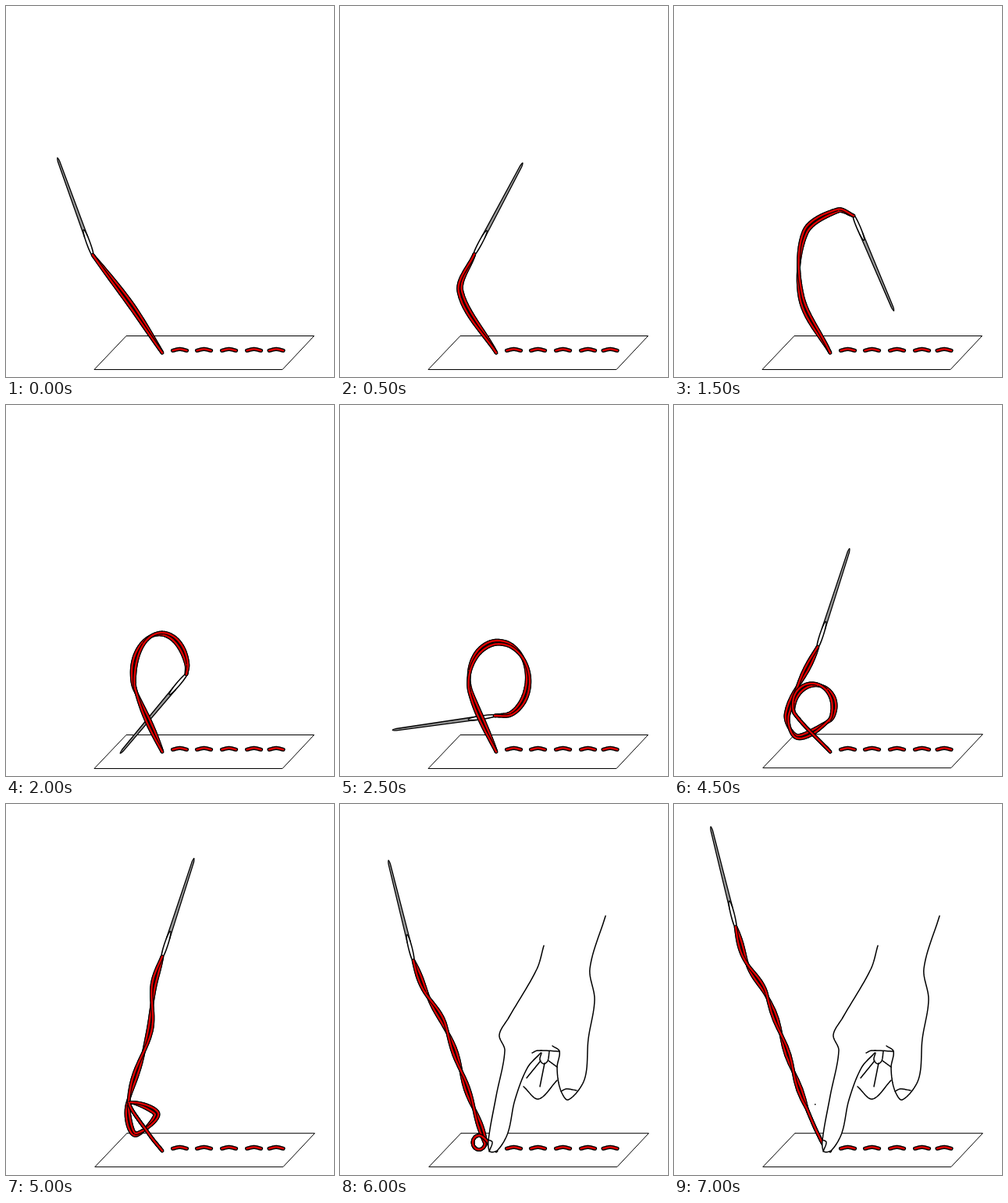
Recreate the animation shown at these times as an HTML page with a canvas. Size 420 by 474 pixels, loop 8 s.

```html
<!DOCTYPE html>
<html lang="en">
<head>
<meta charset="utf-8">
<title>Sewing a knot</title>
<style>
html, body { margin: 0; width: 100%; height: 100%; overflow: hidden; background: #fff; }
canvas { display: block; }
</style>
</head>
<body>
<canvas id="stage" width="420" height="474"></canvas>
<script>
const ctx = document.getElementById('stage').getContext('2d');
const RED = '#e10000', STEPS = 12, NEEDLE = 135, ANCHOR = [200, 443];
const rad = degrees => degrees * Math.PI / 180;

// Points along an elliptic arc, angles in degrees.
function ring(x, y, rx, ry, from, to) {
  return Array.from({ length: 9 }, (_, i) => {
    const a = rad(from + (to - from) * i / 8);
    return [x + rx * Math.cos(a), y + ry * Math.sin(a)];
  }).flat();
}

// Needle eye, needle angle, then the thread's way from the eye to the anchor.
const poses = [
  [111, 318, -110, [160, 382]],
  [172, 317, -62, [154, 365]],
  [222, 272, 28, [182, 276, 163, 350]],
  [230, 268, 67, [210, 261, 168, 289, 163, 372]],
  [231, 344, 130, ring(198, 345, 35, 53, -15, -200)],
  [198, 397, 172, ring(203, 351, 38, 48, 65, -200)],
  [175, 418, 170, ring(177, 349, 39, 46, 45, -205)],
  [109, 428, -51, [108, 436, 150, 431, ...ring(177, 349, 39, 46, 45, -205)]],
  [163, 364, -51, [131, 405, 148, 430, ...ring(179, 362, 34, 49, 50, -205)]],
  [184, 309, -72, [145, 395, 158, 424, ...ring(179, 385, 26, 28, 40, -200)]],
  [200, 195, -72, [189, 232, 184, 290, 156, 384, 165, 422, 193, 396, 158, 382, 184, 423]],
  [94, 200, -104, [110, 241, 134, 283, 165, 371, ...ring(178, 432.5, 8, 9, 0, 315)]],
  [79, 157, -104, [93, 203, 118, 243, 165, 376, 190, 433]]
];

const hand = [
  [261,181, 252,211, 216,273, 204,295, 211,315, 200,373, 190,430, 192,444, 202,442, 215,420, 224,378, 240,337, 257,318],
  [340,143, 320,210, 326,250, 318,300, 313,352, 292,378, 282,364, 278,337, 281,316, 272,309],
  [235,361, 254,377, 278,353],
  [246,318, 253,315, 281,316],
  [258,318, 256,327, 261,332, 266,328, 268,316],
  [257,328, 239,350],
  [262,331, 256,361],
  [267,328, 278,336],
  [283,367, 290,364, 303,366],
  [190,429, 195,432, 191,444]
];

// Smooth curve through a flat list of coordinates, with slopes scaled by chord length.
function curve(list) {
  const pts = [];
  for (let i = 0; i < list.length; i += 2) pts.push([list[i], list[i + 1]]);
  const at = i => pts[Math.max(0, Math.min(pts.length - 1, i))];
  const gap = i => Math.hypot(at(i + 1)[0] - at(i)[0], at(i + 1)[1] - at(i)[1]);
  const slope = (i, axis) => (at(i + 1)[axis] - at(i - 1)[axis]) / (gap(i - 1) + gap(i));
  const out = [pts[0]];
  for (let i = 0; i < pts.length - 1; i++) {
    for (let k = 1; k <= STEPS; k++) {
      const u = k / STEPS, v = 1 - u, d = gap(i);
      out.push([0, 1].map(axis =>
        v * v * (1 + 2 * u) * at(i)[axis] + u * u * (1 + 2 * v) * at(i + 1)[axis] +
        u * v * d * (v * slope(i, axis) - u * slope(i + 1, axis))));
    }
  }
  return out;
}

function trace(points) {
  ctx.beginPath();
  points.forEach(([x, y]) => ctx.lineTo(x, y));
}

function line(points, color, width, cap = 'round') {
  trace(points);
  ctx.strokeStyle = color;
  ctx.lineWidth = width;
  ctx.lineCap = cap;
  ctx.lineJoin = 'round';
  ctx.stroke();
}

// One of two strands that swing around the thread's middle line.
function strand(points, twists, doubled, swing) {
  const last = points.length - 1, lengths = [0];
  for (let i = 1; i <= last; i++) {
    const [x, y] = points[i], [px, py] = points[i - 1];
    lengths.push(lengths[i - 1] + Math.hypot(x - px, y - py));
  }
  return points.map(([x, y], i) => {
    const s = Math.min(1, lengths[i] / lengths[last] / doubled);
    const [ax, ay] = points[Math.max(0, i - 1)], [bx, by] = points[Math.min(last, i + 1)];
    const shift = swing * Math.sin(Math.PI * twists * s) / Math.hypot(bx - ax, by - ay);
    return [x - (by - ay) * shift, y + (bx - ax) * shift];
  });
}

// Drawn piece by piece so that later parts cross over earlier ones.
function drawThread([x, y, , path], step) {
  const points = curve([x, y, ...path, ...ANCHOR]);
  const twists = Math.min(5, 1 + Math.floor(step / 2));
  const doubled = step > 8 ? .8 : 1;
  const strands = [-2.3, 2.3].map(swing => strand(points, twists, doubled, swing));
  strands.forEach(p => line(p, '#000', 4.6));
  for (let i = 0; i < points.length - 1; i += STEPS) {
    for (const p of strands) {
      const piece = p.slice(i, i + STEPS + 1);
      line(piece, '#000', 4.6, 'butt');
      line(piece, RED, 2.3);
    }
  }
}

function drawNeedle([x, y, angle]) {
  ctx.save();
  ctx.translate(x, y);
  ctx.rotate(rad(angle));
  ctx.strokeStyle = '#000';
  ctx.lineWidth = 1.3;
  ctx.fillStyle = '#999';
  ctx.beginPath();
  ctx.moveTo(24, -2.1);
  ctx.lineTo(NEEDLE - 8, -1.2);
  ctx.quadraticCurveTo(NEEDLE + 2, 0, NEEDLE - 8, 1.2);
  ctx.lineTo(24, 2.1);
  ctx.closePath();
  ctx.fill();
  ctx.stroke();
  ctx.fillStyle = '#fff';
  ctx.lineWidth = 1.5;
  ctx.beginPath();
  ctx.ellipse(16, 0, 18, 2.3, 0, 0, 2 * Math.PI);
  ctx.fill();
  ctx.stroke();
  ctx.restore();
}

function drawCloth(shift) {
  ctx.save();
  ctx.translate(shift, -shift);
  line([[154, 421.5], [394.5, 421.5], [354, 464.5], [113, 464.5], [154, 421.5]], '#000', 1);
  ctx.restore();
  for (const x of [222.5, 253.5, 285.5, 317.5, 346]) {
    const stitch = curve([x - 9, 440.2, x, 438.4, x + 9, 440.2]);
    line(stitch, '#000', 5.2);
    line(stitch, RED, 2.4);
  }
}

function drawHand() {
  trace(curve(hand[0]));
  ctx.fillStyle = '#fff';
  ctx.fill();
  hand.forEach(list => line(curve(list), '#000', 1.5));
}

function draw(now) {
  const t = now % 8000;
  const step = t < 6000 ? Math.floor(t / 500) : t < 7000 ? 11 : 12;
  ctx.fillStyle = '#fff';
  ctx.fillRect(0, 0, 420, 474);
  drawCloth(t < 4500 ? 0 : .8);
  drawNeedle(poses[step]);
  drawThread(poses[step], step);
  if (t >= 6000) drawHand();
  if (t >= 7000) {
    ctx.fillStyle = '#000';
    ctx.fillRect(180, 383, 1.5, 1.5);
  }
  requestAnimationFrame(draw);
}
requestAnimationFrame(draw);
</script>
</body>
</html>
```
